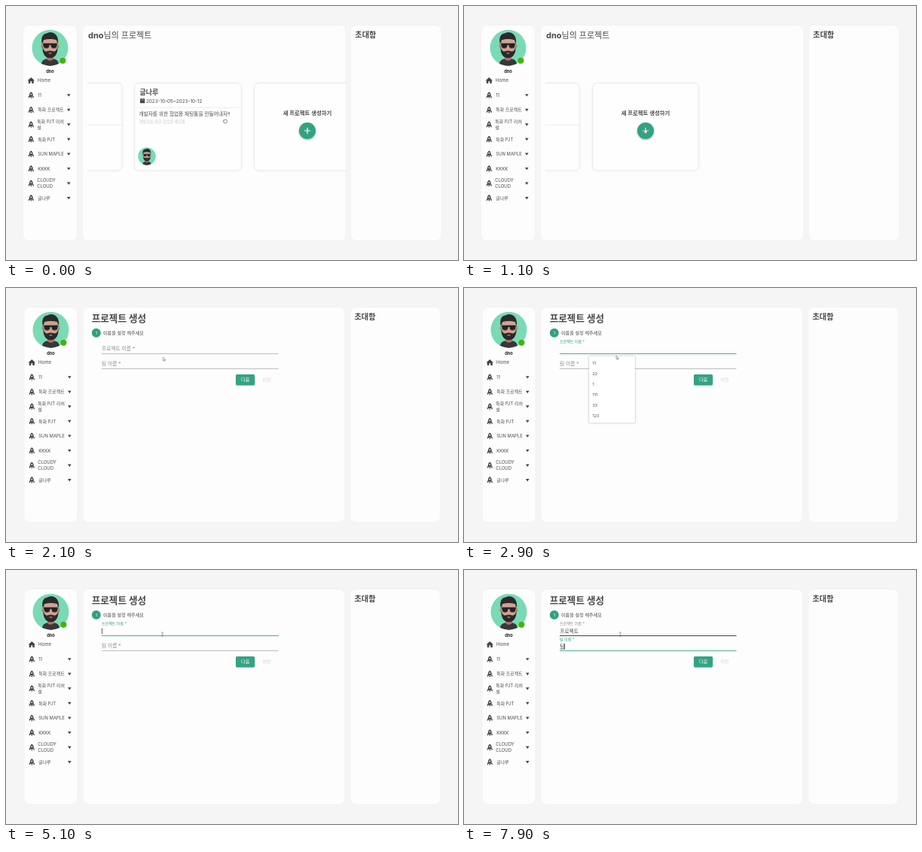
An HTML page that plays this animation: 600 by 338 pixels, repeating every 8000 ms.

```html
<!DOCTYPE html>
<html lang="ko">
<head>
<meta charset="utf-8">
<title>프로젝트 생성</title>
<style>
  html, body { margin: 0; width: 100%; height: 100%; overflow: hidden; background: #f6f5f6; }
  svg { display: block; width: 100%; height: 100%; }
  text { font-family: Inter, "Noto Sans CJK KR", "Noto Sans CJK", sans-serif; fill: #4a4a4a; white-space: pre; }
  .bold { font-weight: 700; }
  .mid { text-anchor: middle; }
  .panel { fill: #fdfdfd; stroke: #f0eff0; stroke-width: .6; }
  .card { fill: #fefefe; stroke: #eee; stroke-width: .5; filter: drop-shadow(0 .8px 1.6px #0002); }
  .rule { fill: #e6e6e6; }

  .anim { animation: 8s linear infinite; }
  .cut { animation: 8s step-end infinite; }

  #home { animation-name: home; }
  #form { animation-name: form; }
  #side { animation-name: side; }
  #status { animation-name: status; }
  #menu { animation-name: menu; }
  #open { animation-name: open; }
  #shut { animation-name: shut; }
  #slide { animation-name: slide; }
  #cursor { animation-name: cursor; }
  #hand { animation-name: home; }
  #arrow { animation-name: arrow; }
  #beam { animation-name: beam; }
  #label1 { animation-name: label1; }
  #label2 { animation-name: label2; }
  #hover { animation-name: hover; }
  #focus1 { animation-name: focus1; }
  #focus2 { animation-name: focus2; }
  #focus1, #focus2 { transform-origin: 244px 0; }

  @keyframes home { 0% { visibility: visible } 15%, to { visibility: hidden } }
  @keyframes form { 0% { visibility: hidden } 15%, to { visibility: visible } }
  @keyframes side { 0% { transform: none } 15%, to { transform: translate(1px, 0) } }
  @keyframes status { 0%, 21.9%, to { visibility: hidden } 16.25% { visibility: visible } }
  @keyframes menu { 0%, 60%, to { visibility: hidden } 32.5% { visibility: visible } }
  @keyframes open { 0% { opacity: 1 } 2.5%, to { opacity: 0 } }
  @keyframes shut { 0% { opacity: 0 } 2.5%, to { opacity: 1 } }
  @keyframes slide {
    0%, 1.25% { transform: none; animation-timing-function: ease }
    5% { transform: translate(-159px, 0) }
    6%, 7% { transform: translate(-164px, 0); animation-timing-function: ease }
    9.5%, to { transform: translate(-159px, 0) }
  }
  @keyframes cursor {
    0%, 1% { transform: translate(291px, 153px) }
    6%, 9% { transform: translate(275px, 158px); animation-timing-function: ease-in-out }
    13.5%, 20% { transform: translate(241px, 166.5px); animation-timing-function: ease-in-out }
    28%, 32% { transform: translate(205px, 84px) }
    35%, 40% { transform: translate(202px, 90px) }
    43.75%, to { transform: translate(207.5px, 85.5px) }
  }
  @keyframes arrow {
    0%, 28%, 43%, to { visibility: hidden }
    15%, 32.5% { visibility: visible }
  }
  @keyframes beam {
    0%, 32.5% { visibility: hidden }
    28%, 43%, to { visibility: visible }
  }
  @keyframes label1 {
    0%, 31.25% { transform: translate(127px, 83px); fill: #8a8a8a }
    33.75%, 92.5% { transform: translate(127px, 73.3px) scale(.75); fill: #30a080 }
    93.5%, to { transform: translate(127px, 73.3px) scale(.75); fill: #8a8a8a }
  }
  @keyframes label2 {
    0%, 92.5% { transform: translate(127px, 103.4px); fill: #8a8a8a }
    95%, to { transform: translate(127px, 93.7px) scale(.75); fill: #30a080 }
  }
  @keyframes hover {
    0%, 32.5% { opacity: 0 }
    28%, 43%, to { opacity: 1 }
  }
  @keyframes focus1 {
    0%, 31.25% { transform: scaleX(0) }
    33.75%, 92.5% { transform: none }
    95%, to { transform: scaleX(0) }
  }
  @keyframes focus2 {
    0%, 92.5% { transform: scaleX(0) }
    95%, to { transform: none }
  }
</style>
</head>
<body>
<svg viewBox="0 0 600 338" preserveAspectRatio="none">
  <defs>
    <clipPath id="round"><circle r="24"/></clipPath>
    <clipPath id="track"><rect x="108" y="90" width="342.5" height="145"/></clipPath>
    <g id="avatar">
      <circle r="24" fill="#79dab5"/>
      <g clip-path="url(#round)">
        <path d="M-4.500 8H4.500V18H-4.500Z" fill="#a87562"/>
        <path d="M-12 25C-12 18-9 15.500-5 14.500Q0 19.500 5 14.500C9 15.500 12 18 12 25Z" fill="#37373b"/>
        <ellipse cx="-10.300" cy="-2.500" rx="1.700" ry="2.700" fill="#b98370"/>
        <ellipse cx="10.300" cy="-2.500" rx="1.700" ry="2.700" fill="#b98370"/>
        <path d="M-9.500-11H9.500V4Q7 11 0 12Q-7 11-9.500 4Z" fill="#d3a18d"/>
        <path d="M-10-2C-9 3-7 5.500-4 4.500Q0 3 4 4.500C7 5.500 9 3 10-2C10.500 8 6.500 13.500 0 13.500S-10.500 8-10-2Z" fill="#2a292b"/>
        <path d="M-2.700 7Q0 5.800 2.700 7Q0 9 -2.700 7Z" fill="#b57a6d"/>
        <path d="M-10.300-4C-13-13-10-19-4-19.500C2-23 13-19 10.300-4L8.500-10.500Q0-13-8.500-10.500Z" fill="#2b2a2c"/>
        <path d="M-10-6.500H10L8.800-.5Q5 2.500 1.200-.5L.7-3.500H-.7L-1.200-.5Q-5 2.500-8.800-.5Z" fill="#232124" stroke="#d9cfca" stroke-width=".5"/>
      </g>
    </g>
    <g id="rocket" fill="#484848">
      <path d="M0-4.500C2.300-3 2.900-.5 2.400 2.300H-2.400C-2.900-.5-2.300-3 0-4.500ZM-2.200.5V3.200L-3.500 3.800V1.700ZM2.200.5V3.200L3.500 3.800V1.700ZM-1.300 2.800H1.300L0 4.500Z"/>
      <circle cy="-1.100" r=".95" fill="#fff"/>
    </g>
  </defs>
  <rect width="600" height="338" fill="#f6f5f6"/>

  <g id="home" class="cut">
    <rect class="panel" x="22.500" y="25.500" width="72" height="287" rx="8"/>
    <rect class="panel" x="101.500" y="25.500" width="349.500" height="287" rx="8"/>
    <rect class="panel" x="457.500" y="25.500" width="120.500" height="287" rx="8"/>
    <text x="109" y="43" font-size="11"><tspan class="bold">dno</tspan>님의 프로젝트</text>
    <text class="bold" x="463.300" y="42.300" font-size="10.200">초대함</text>
    <g clip-path="url(#track)">
      <g id="slide" class="anim">
        <rect class="card" x="12" y="103" width="141.500" height="115.500" rx="6"/>
        <rect class="rule" x="12" y="158" width="141.500" height=".7"/>
        <rect class="card" x="171" y="103" width="141" height="115.500" rx="6"/>
        <rect id="shut" class="cut rule" x="171" y="158" width="141" height=".7"/>
        <g id="open" class="cut">
          <text class="bold" x="177.500" y="118" font-size="9">글나루</text>
          <path d="M178 123.500H179V122.800H180V123.500H182.500V122.800H183.500V123.500H184.300V129.300H178Z" fill="#444"/>
          <path d="M178.500 125.100H183.800" stroke="#fff" stroke-width=".4"/>
          <text x="186" y="128.500" font-size="6.350">2023-10-05~2023-10-12</text>
          <rect class="rule" x="171" y="134.800" width="141" height=".7"/>
          <text x="176.500" y="145.600" font-size="6.650">개발자를 위한 협업용 채팅툴을 만들어내자!!</text>
          <text x="176.500" y="155.500" font-size="5.200" style="fill:#ccc">개발자를 위한 협업용 채팅툴</text>
          <use href="#avatar" transform="translate(187 200) scale(.49)"/>
        </g>
        <rect class="card" x="330" y="103" width="140" height="115.500" rx="6"/>
        <text class="bold mid" x="400" y="144.700" font-size="7.400">새 프로젝트 생성하기</text>
        <circle cx="400" cy="166" r="11" fill="#30a482" style="filter:drop-shadow(0 1px 1.200px #0005)"/>
        <path d="M396 166H404M400 162V170" stroke="#fff" stroke-width="1.200"/>
      </g>
    </g>
  </g>

  <g id="form" class="cut">
    <rect class="panel" x="24" y="25.500" width="71" height="286.500" rx="8"/>
    <rect class="panel" x="102" y="25.500" width="347.500" height="286.500" rx="8"/>
    <rect class="panel" x="457" y="25.500" width="119.500" height="286.500" rx="8"/>
    <text class="bold" x="113.700" y="44.600" font-size="12.600">프로젝트 생성</text>
    <text class="bold" x="462.400" y="42.200" font-size="10.200">초대함</text>
    <circle cx="119.800" cy="59.800" r="6" fill="#30a080"/>
    <text class="mid" x="119.800" y="61.800" font-size="5.400" style="fill:#fff">1</text>
    <text x="129" y="61.900" font-size="6.100">이름을 설정 해주세요</text>
    <rect x="127" y="87" width="234.500" height="1" fill="#bdbdbd"/>
    <rect id="hover" class="cut" x="127" y="87" width="234.500" height="1" fill="#444"/>
    <rect id="focus1" class="anim" x="127" y="87" width="234.500" height="1" fill="#4fae95"/>
    <rect x="127" y="107" width="234.500" height="1" fill="#bdbdbd"/>
    <rect id="focus2" class="anim" x="127" y="107" width="234.500" height="1" fill="#4fae95"/>
    <g font-size="6.700">
      <text id="label1" class="anim" style="fill:inherit">프로젝트 이름 *</text>
      <text id="label2" class="anim" style="fill:inherit">팀 이름 *</text>
      <text id="name" x="127.300" y="83.900"></text>
      <text id="team" x="127.300" y="104.200"></text>
    </g>
    <rect id="compose" height=".5" fill="#555"/>
    <rect id="caret" width=".8" height="7.500" fill="#333"/>
    <rect x="305" y="115" width="25.200" height="14.500" rx="1.800" fill="#33a384" style="filter:drop-shadow(0 .5px .5px #0004)"/>
    <text class="mid" x="317.700" y="124.300" font-size="6.100" style="fill:#fff">다음</text>
    <text class="mid" x="346" y="124.300" font-size="6.100" style="fill:#d0d0d0">이전</text>
  </g>

  <g id="side" class="cut">
    <use href="#avatar" x="58.500" y="55.700"/>
    <circle cx="75.200" cy="72.600" r="4.500" fill="#3fb50c" stroke="#dff3e0" stroke-width=".6"/>
    <text class="bold mid" x="58.500" y="89" font-size="5.700" style="fill:#222">dno</text>
    <path d="M33.300 95L38 99.300H36.800V103H34.300V100.300H32.300V103H29.800V99.300H28.600Z" fill="#444"/>
    <text x="42" y="101.300" font-size="6.100">Home</text>
  </g>

  <g id="menu" class="cut">
    <rect x="166" y="90.500" width="61" height="89" rx="1" fill="#fff" stroke="#e4e4e4" stroke-width=".4" style="filter:drop-shadow(0 .8px 1px #0004)"/>
  </g>
  <g id="status" class="cut">
    <rect y="329" width="200" height="9" fill="#f5d9ca"/>
    <text x="1.500" y="335.500" font-size="4.900">j9e205.p.ssafy.io의 응답을 기다리는 중...</text>
  </g>

  <g id="cursor" class="anim">
    <path id="hand" class="cut" d="M-1.500 2.700L-2.800.2Q-2.500-.6-1.600.2V-1.700Q-1.100-2.500-.6-1.700Q0-2.800.5-1.800Q1.200-2.500 1.500-1.500Q2.300-1.700 2.300-.8V1Q2 2 1.600 2.800Z" fill="#fff" stroke="#444" stroke-width=".6"/>
    <path id="arrow" class="cut" d="M0 0V4.800L1.100 3.800L1.900 5.500L2.600 5.200L1.900 3.500H3.300Z" fill="#fff" stroke="#555" stroke-width=".5"/>
    <path id="beam" class="cut" d="M-1-2.500H1M0-2.500V2.500M-1 2.500H1" fill="none" stroke="#444" stroke-width=".6"/>
  </g>
</svg>
<script>
  const LOOP = 8000;
  const $ = id => document.getElementById(id);

  function add(parent, tag, attrs, text = '') {
    const node = document.createElementNS('http://www.w3.org/2000/svg', tag);
    for (const key in attrs) node.setAttribute(key, attrs[key]);
    node.textContent = text;
    parent.append(node);
    return node;
  }

  const projects = ['11', '특화 프로젝트', '특화 PJT 리허\n설', '특화 PJT', 'SUN MAPLE', 'KKKK', 'CLOUDY\nCLOUD', '글나루'];
  projects.forEach((title, i) => {
    const y = 118.7 + i * 19.55;
    const lines = title.split('\n');
    add($('side'), 'use', { href: '#rocket', x: 33.3, y });
    lines.forEach((line, j) => add($('side'), 'text', {
      x: lines.length > 1 ? 41.3 : 42.2,
      y: y + 2.2 + (j - (lines.length - 1) / 2) * 7.6,
      'font-size': 5.95
    }, line));
    add($('side'), 'path', { d: `M81 ${y - 1.5}h4.600l-2.300 3.400z`, fill: '#444' });
  });

  ['11', '22', '1', '111', '33', '123'].forEach((word, i) =>
    add($('menu'), 'text', { x: 170.5, y: 101.8 + i * 14.1, 'font-size': 5.4 }, word));

  // Each entry: start time in ms, then the typed text.
  const nameKeys = [
    [0, ''], [5500, 'ㅍ'], [5600, '프'], [5750, '플'], [5850, '프로'], [5950, '프롲'], [6050, '프로제'],
    [6150, '프로제ㅐ'], [6250, '프로제ㅐㄱ'], [6450, '프로제ㅐ'], [6550, '프로제'], [6650, '프로'],
    [6750, '프롲'], [6850, '프로제'], [6950, '프로젝'], [7050, '프로젝ㅌ'], [7150, '프로젝트']
  ];
  const teamKeys = [[0, ''], [7600, 'ㅌ'], [7700, '티'], [7800, '팀']];
  const textAt = (keys, t) => keys.filter(key => key[0] <= t).pop()[1];

  function place(id, x, y, shown) {
    $(id).setAttribute('x', x);
    $(id).setAttribute('y', y);
    $(id).setAttribute('opacity', shown ? 1 : 0);
  }

  function draw(t) {
    $('name').textContent = textAt(nameKeys, t);
    $('team').textContent = textAt(teamKeys, t);
    const onTeam = t >= 7400;
    const field = $(onTeam ? 'team' : 'name');
    const top = onTeam ? 98 : 77.5;
    const typed = field.textContent;
    const width = typed ? field.getComputedTextLength() : 0;
    const blink = t >= 5500 || t % 1000 < 500;
    place('caret', 127 + width, top, t >= 2500 && blink);
    const last = typed ? width / typed.length : 0;
    $('compose').setAttribute('width', last);
    place('compose', 127.3 + width - last, top + 7, typed !== '');
  }

  let start;
  function tick(now) {
    start ??= now;
    draw((now - start) % LOOP);
    requestAnimationFrame(tick);
  }
  requestAnimationFrame(tick);
</script>
</body>
</html>
```
